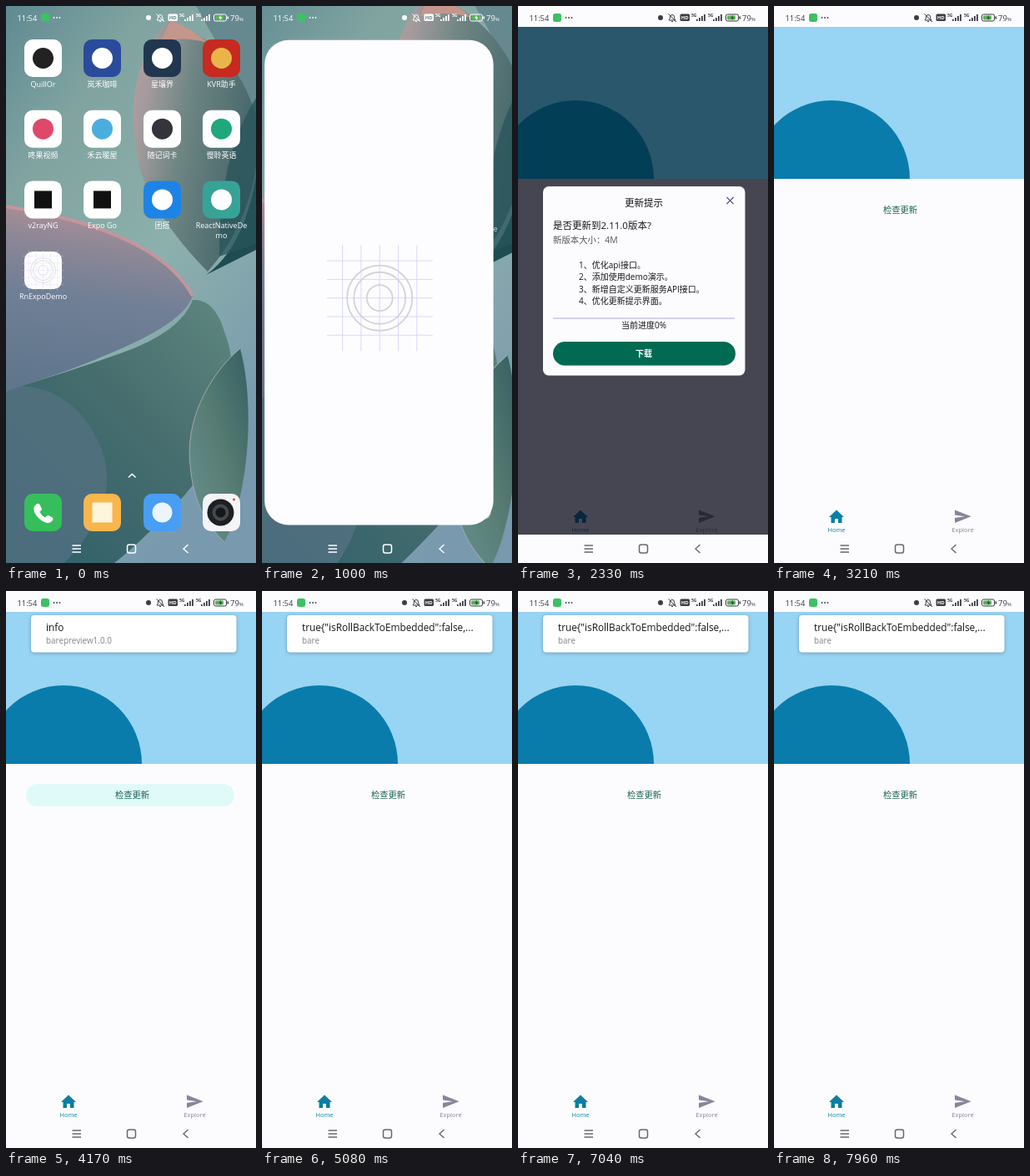
An HTML page that plays this animation: 300x667 px, repeating every 8 s.

```html
<!DOCTYPE html>
<html lang="zh">
<head>
<meta charset="utf-8">
<title>App update demo</title>
<style>
  html, body { margin: 0; width: 100%; height: 100%; overflow: hidden; background: #fff; }
  svg { display: block; width: 100%; height: 100%; font-family: "Open Sans", "Noto Sans CJK SC", "Noto Sans CJK", sans-serif; }
  .mid { text-anchor: middle; }
  .line { fill: none; stroke: currentColor; }
  #toast rect { filter: drop-shadow(0 1px 2px #0004); }
</style>
</head>
<body>
<svg viewBox="0 0 300 667">
  <defs>
    <linearGradient id="sky" x2=".6" y2="1"><stop stop-color="#5f8a92"/><stop offset=".25" stop-color="#80a3a0"/><stop offset=".6" stop-color="#8cb0ac"/><stop offset="1" stop-color="#7899ae"/></linearGradient>
    <linearGradient id="petalTop" x2="1" y2=".35"><stop stop-color="#bc9f9f"/><stop offset=".2" stop-color="#a19a9c"/><stop offset=".5" stop-color="#6d8583"/><stop offset="1" stop-color="#46666a"/></linearGradient>
    <linearGradient id="petalLeft" x1=".5" x2=".35" y2="1"><stop stop-color="#b3919a"/><stop offset=".22" stop-color="#8d8796"/><stop offset=".5" stop-color="#707f96"/><stop offset="1" stop-color="#5f768c"/></linearGradient>
    <linearGradient id="petalLow" x1="1" x2=".1" y2="1"><stop stop-color="#5f877f"/><stop offset=".45" stop-color="#476d6e"/><stop offset="1" stop-color="#2f606a"/></linearGradient>
    <linearGradient id="petalRight" x1="1" x2="0" y2="1"><stop stop-color="#365f62"/><stop offset=".5" stop-color="#577d73"/><stop offset="1" stop-color="#6a9092"/></linearGradient>
    <clipPath id="header"><path d="M0 25H300V207H0z"/></clipPath>
    <clipPath id="frame"><rect id="frameShape"/></clipPath>
    <g id="rings" fill="none">
      <path id="grid" stroke="#d6d5fa"/>
      <g stroke="#d3d3d8" stroke-width="2"><circle r="43"/><circle r="34"/><circle r="17"/></g>
    </g>
  </defs>

  <g id="home">
    <g id="wallpaper">
      <path d="M0 0H300V667H0z" fill="url(#sky)"/>
      <path d="M228 0H300V140L262 60z" fill="#66898f"/>
      <path d="M300 205Q285 290 240 322L300 292z" fill="#1f4c50"/>
      <path d="M197 17C145 60 138 170 180 240C205 280 225 300 242 318C285 270 310 200 300 130C280 70 250 40 197 17z" fill="url(#petalTop)"/>
      <path d="M197 17Q222 26 242 44Q215 36 186 42z" fill="#c4968c"/>
      <path d="M300 110Q255 180 256 300L300 285z" fill="#27545a" opacity=".75"/>
      <path d="M0 460Q70 440 140 415T224 352Q250 350 262 390C285 445 262 530 215 585Q165 640 130 667H0z" fill="url(#petalLow)"/>
      <path d="M0 455Q75 450 110 520T70 667H0z" fill="#577385" opacity=".7"/>
      <path d="M0 240C95 255 190 285 224 347C215 375 165 400 115 420C70 440 30 450 0 462z" fill="url(#petalLeft)"/>
      <path d="M0 240C95 255 190 285 224 347" fill="none" stroke="#c3969c" stroke-width="4"/>
      <path d="M281 410C240 445 215 500 221 550C225 595 240 620 262 642C290 590 300 480 281 410z" fill="url(#petalRight)"/>
      <path d="M281 410C240 445 215 500 221 550C225 595 240 620 262 642" fill="none" stroke="#a3a7aa"/>
    </g>
    <g id="icons"></g>
  </g>

  <g id="app">
    <path d="M0 0H300V667H0z" fill="#fcfcfe"/>
    <path d="M0 25H300V207H0z" fill="#98d4f4"/>
    <circle cx="69" cy="207" r="94" fill="#0a7cac" clip-path="url(#header)"/>
    <rect id="ripple" x="24" y="231" width="250" height="27" rx="13" fill="#d4fafa"/>
    <text class="mid" x="151.500" y="248" font-size="10.3" fill="#17604f">检查更新</text>
    <g fill="#0a7ea4">
      <path d="M66 612l9-8.500 9 8.500h-2.500v7h-4.500v-5h-4v5h-4.500v-7z"/>
      <text class="mid" x="75" y="629.500" font-size="7.400">Home</text>
    </g>
    <g fill="#85859a">
      <path d="M217 603.500l19.500 7.800-19.500 7.700v-6l12-1.700-12-1.700z"/>
      <text class="mid" x="226.500" y="629.500" font-size="7.600">Explore</text>
    </g>
    <g id="dialog">
      <path d="M0 25H300V207H0z" fill="#002837" fill-opacity=".72"/>
      <path d="M0 207H300V633H0z" fill="#0a0a18" fill-opacity=".75"/>
      <rect x="30" y="216" width="242.500" height="226.500" rx="7" fill="#fcfcff"/>
      <path d="M250.500 229l8 8m0-8l-8 8" stroke="#4c4a7c" stroke-width="1.200"/>
      <g fill="#151518" font-size="10">
        <text class="mid" x="151" y="239.500" font-size="11.500">更新提示</text>
        <text x="42" y="266.500" font-size="11.500">是否更新到2.11.0版本?</text>
        <text x="42" y="284" font-size="10.400" fill="#55555c">新版本大小：4M</text>
        <text x="73" y="313.500">1、优化api接口。</text>
        <text x="73" y="328">2、添加使用demo演示。</text>
        <text x="73" y="342.500">3、新增自定义更新服务API接口。</text>
        <text x="73" y="357">4、优化更新提示界面。</text>
        <text class="mid" x="151" y="386">当前进度0%</text>
      </g>
      <path d="M42 374H260" stroke="#d3d1f6" stroke-width="2"/>
      <rect x="42" y="402" width="219" height="28.500" rx="14.250" fill="#006b52"/>
      <text class="mid" x="151" y="419.700" font-size="10" font-weight="600" fill="#fff">下载</text>
    </g>
  </g>

  <g id="splash" clip-path="url(#frame)">
    <path d="M0 0H300V667H0z" fill="#fdfdff"/>
    <use id="logo" href="#rings"/>
  </g>

  <g id="toast">
    <rect x="30" y="29" width="246.500" height="44.500" rx="4" fill="#fff"/>
    <text id="toastTitle" x="48" y="48" font-size="11.800" fill="#17171a"></text>
    <text id="toastBody" x="48" y="63" font-size="9.900" fill="#85858c"></text>
  </g>

  <g id="status"></g>
  <g id="keys" class="line">
    <path stroke-width="1.300" d="M79.500 646H90M79.500 650H90M79.500 654H90"/>
    <rect stroke-width="1.500" x="145.500" y="645" width="10" height="10" rx="2.500"/>
    <path stroke-width="1.400" d="M218.500 645l-5.500 5 5.500 5"/>
  </g>
</svg>

<script>
const LOOP = 8000;
const $ = id => document.getElementById(id);
const lerp = (a, b, p) => a + (b - a) * p;
const ramp = (t, start, end) => Math.min(1, Math.max(0, (t - start) / (end - start)));
const easeOut = u => 1 - (1 - u) ** 3;
const set = (id, attrs) => { for (const k in attrs) $(id).setAttribute(k, attrs[k]); };

// Construction grid behind the rings
const gridLines = [-49, -24.5, 0, 24.5, 49];
set('grid', { d: gridLines.map(v => `M${v} -70V70M-70 ${v}H70`).join('') });

const columns = [22, 93, 165, 236];
const tile = (x, y, fill) => `<rect x="${x}" y="${y}" width="45" height="45" rx="10" fill="${fill}"/>`;
const disc = (x, y, r, fill) => `<circle cx="${x}" cy="${y}" r="${r}" fill="${fill}"/>`;
const square = (x, y, size, fill) => `<rect x="${x - size / 2}" y="${y - size / 2}" width="${size}" height="${size}" fill="${fill}"/>`;

// label, tile colour, mark colour, square mark
const apps = [
  ['QuillOr', '#fff', '#222'],
  ['岚禾咖啡', '#2a4a9c', '#fff'],
  ['星壤界', '#21364f', '#fff'],
  ['KVR助手', '#c62a20', '#e9b54a'],
  ['咚果视频', '#fff', '#e0486a'],
  ['禾云暖屋', '#fff', '#49aede'],
  ['随记词卡', '#fff', '#33343c'],
  ['慢聆英语', '#fff', '#1ea87c'],
  ['v2rayNG', '#fff', '#111', true],
  ['Expo Go', '#fff', '#111', true],
  ['团搭', '#1d83e6', '#fff'],
  ['ReactNativeDe|mo', '#37a396', '#fff'],
  ['RnExpoDemo', '#fdfdff']
];

function appIcon([label, back, mark, isSquare], i) {
  const x = columns[i % 4], y = 40 + Math.floor(i / 4) * 84.7, cx = x + 22.5, cy = y + 22.5;
  const art = !mark ? `<use href="#rings" transform="translate(${cx} ${cy}) scale(.35)"/>`
    : isSquare ? square(cx, cy, 21, mark) : disc(cx, cy, 12.5, mark);
  const lines = label.split('|').map((s, n) =>
    `<text class="mid" x="${cx}" y="${y + 57 + n * 11.5}" font-size="9" fill="#fff">${s}</text>`);
  return tile(x, y, back) + art + lines.join('');
}

const dock =
  tile(22, 584, '#36be5c') +
  '<path d="M36 597q3-3 5 1l2 4q0 2-2.500 3.500q2 5 6.500 7q2-3 4-2.500l4 2q3 2 0 5q-4 4-11 0q-7-4.500-10-11q-2-6 2-9z" fill="#fff"/>' +
  tile(93, 584, '#f8b64c') + square(115.5, 606.5, 24, '#fff4dc') +
  tile(165, 584, '#479ef3') + disc(187.5, 606.5, 12, '#eaf5ff') +
  tile(236, 584, '#f4f4f6') + disc(257.5, 606.5, 16, '#1d1f22') + disc(257.5, 606.5, 10, '#45484c') +
  disc(257.5, 606.5, 6, '#15181b') + disc(273.5, 591, 1.5, '#e04848') +
  '<path d="M147 564.500l4.300-4 4.300 4" fill="none" stroke="#fff" stroke-width="1.500"/>';

$('icons').innerHTML = apps.map(appIcon).join('') + dock;

// Status bar, tinted by currentColor
const signal = x => `<text x="${x}" y="13" font-size="5" font-weight="700">5G</text>` +
  [2, 4, 6, 8].map((h, i) => `<rect x="${x + 6 + i * 3}" y="${18 - h}" width="1.800" height="${h}"/>`).join('');

$('status').innerHTML = `<g fill="currentColor">
  <text x="13.500" y="17.500" font-size="9.300">11:54</text>
  <rect x="42" y="9" width="10" height="10" rx="2.500" fill="#3fc063"/>
  ${[57.5, 61, 64.5].map(x => disc(x, 14, .9, 'currentColor')).join('')}
  ${disc(171, 14, 3, 'currentColor')}
  <path class="line" d="M181 17h8q-1.500-1.500-1.500-4a2.500 2.500 0 0 0-5 0q0 2.500-1.500 4M184 18.500h2M180.500 9.500l9.500 9.500"/>
  <rect x="194.500" y="9.500" width="11.500" height="8.500" rx="1.500"/>
  <text id="hd" class="mid" x="200.200" y="16" font-size="6" font-weight="700">HD</text>
  ${signal(208)}${signal(228)}
  <rect class="line" x="249.500" y="10" width="15" height="8" rx="2"/>
  <rect x="251" y="11.500" width="10" height="5" rx="1" fill="#55b94f"/>
  <path d="M265.500 12.500h1.500v3h-1.500zM258 10.500l-3 4h2.200l-.7 3 3-4h-2.200z"/>
  <text x="269" y="17.500" font-size="9.500">79<tspan font-size="6">%</tspan></text>
</g>`;

function zoom(scale) {
  return `translate(150 333.500) scale(${scale}) translate(-150 -333.500)`;
}

function draw(t) {
  // The launched window grows out of its icon
  const open = easeOut(ramp(t, 760, 1260));
  const x = lerp(22, 0, open), y = lerp(294, 0, open);
  const width = lerp(45, 300, open ** .7), bottom = lerp(339, 667, open);
  set('frameShape', { x, y, width, height: bottom - y, rx: open < 1 ? lerp(10, 29, Math.min(1, open * 1.2)) : 0 });
  set('logo', {
    transform: `translate(${x + width * .503} ${lerp(316, 333, open) + 45 * Math.sin(Math.PI * open)}) scale(${lerp(.35, 1, open)})`
  });
  set('wallpaper', { transform: zoom(1 + .12 * open) });
  set('icons', { transform: zoom(1 - .055 * open), opacity: 1 - .3 * open });
  set('splash', { opacity: t < 760 ? 0 : 1 - ramp(t, 1460, 1860) });

  const inApp = t > 1300;
  set('app', { visibility: inApp ? 'visible' : 'hidden' });
  set('dialog', { opacity: 1 - ramp(t, 3000, 3200) });
  set('ripple', { opacity: ramp(t, 3700, 3880) * (1 - ramp(t, 4050, 4450)) });

  const drop = easeOut(ramp(t, 3780, 4030));
  set('toast', { transform: `translate(0 ${lerp(-80, 0, drop)})` });
  const checked = t >= 4700;
  $('toastTitle').textContent = checked ? 'true{"isRollBackToEmbedded":false,...' : 'info';
  $('toastBody').textContent = checked ? 'bare' : 'barepreview1.0.0';

  const dark = t > 1080;
  set('status', { color: dark ? '#3c3c42' : '#fff' });
  set('keys', { color: dark ? '#68686e' : '#fff' });
  set('hd', { fill: dark ? '#fff' : '#5f858b' });
}

function tick() {
  draw(performance.now() % LOOP);
  requestAnimationFrame(tick);
}
tick();
</script>
</body>
</html>
```
